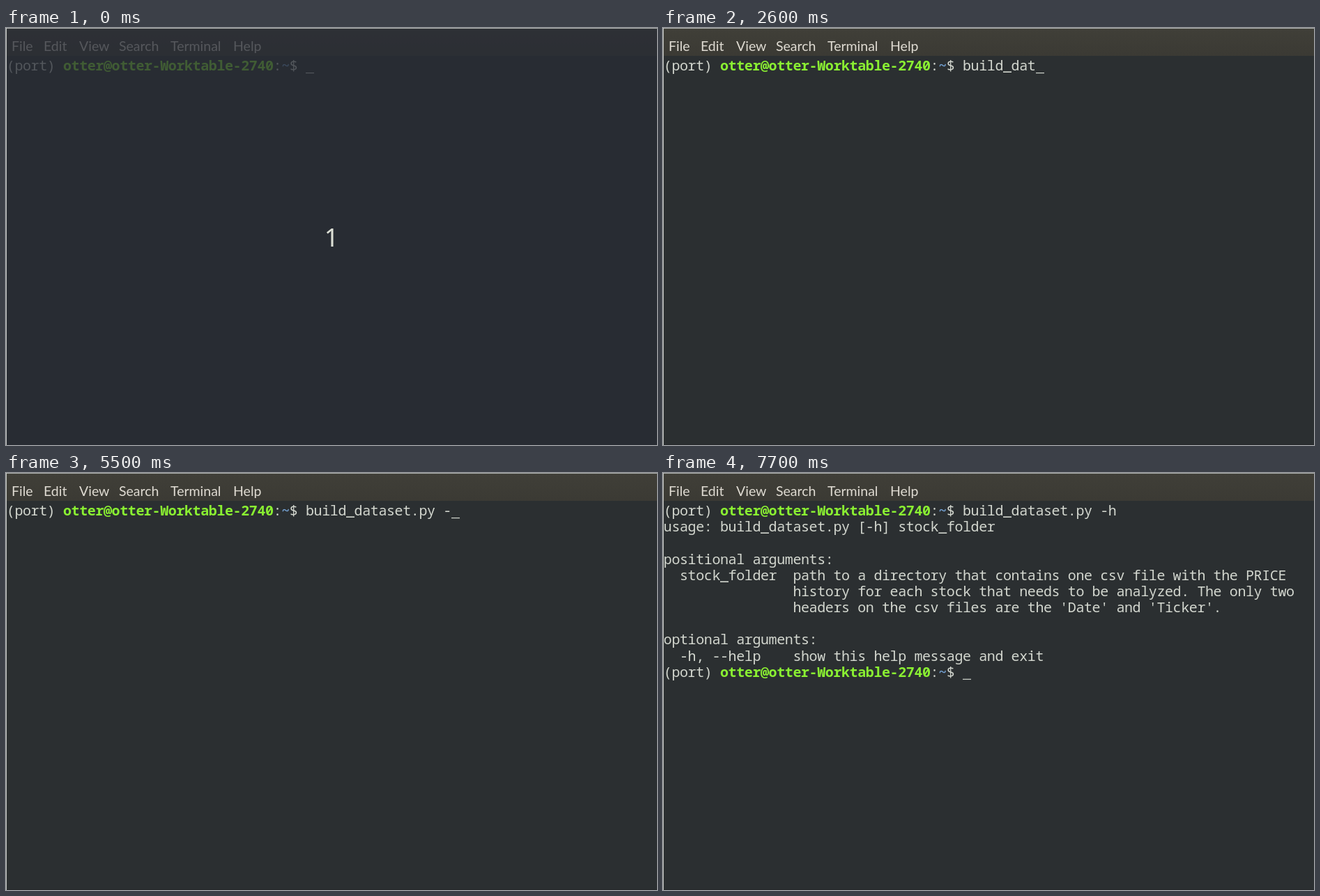
An HTML page with a canvas for the animation above (8000 ms loop, 934 by 599 pixels).

```html
<!DOCTYPE html>
<html lang="en">
<head>
<meta charset="utf-8">
<title>Terminal session</title>
<style>
  html, body { margin: 0; width: 100%; height: 100%; overflow: hidden; background: #2b2f31; }
  canvas { display: block; width: 934px; height: 599px; }
</style>
</head>
<body>
<canvas id="stage" width="934" height="599"></canvas>
<script>
const ctx = document.getElementById('stage').getContext('2d');
const LOOP = 8000, W = 934, H = 599;
const LEFT = 1, CELL = 11.6, ROW = 23.17, BASE = 61;
const TEXT = '#d3d7cf', GREEN = '#8af032', BLUE = '#729fcf';
const MONO = '20px "Noto Sans Mono", monospace';

const MENU = [['File', 8], ['Edit', 54], ['View', 105], ['Search', 162], ['Terminal', 236], ['Help', 326]];
const PROMPT = [['(port) ', TEXT], ['otter@otter-Worktable-2740', GREEN, true], [':', TEXT], ['~', BLUE, true], ['$ ', TEXT]];
const PROMPT_COLS = PROMPT.reduce((n, [s]) => n + s.length, 0);

const COMMAND = 'build_dataset.py -h';
// One key time per character of the command.
const KEYS = [900, 1000, 1100, 1300, 1500, 2200, 2300, 2500, 2600, 2800, 3100,
  3300, 3500, 3800, 4000, 4300, 5400, 5500, 5700];
const ENTER = 6700, OUTPUT = 7000, READY = 7100;
const HIDDEN = [[400, 800], [4900, 5200], [6200, 6500], [7200, 7700]];

const HELP = [
  'usage: build_dataset.py [-h] stock_folder',
  '',
  'positional arguments:',
  '  stock_folder  path to a directory that contains one csv file with the PRICE',
  '                history for each stock that needs to be analyzed. The only two',
  "                headers on the csv files are the 'Date' and 'Ticker'.",
  '',
  'optional arguments:',
  '  -h, --help    show this help message and exit'
];

function rect(x, y, w, h, color) {
  ctx.fillStyle = color;
  ctx.fillRect(x, y, w, h);
}

function label(str, x, y, font, color) {
  ctx.font = font;
  ctx.fillStyle = color;
  ctx.fillText(str, x, y);
}

// Places each character on the terminal grid.
function write(str, col, row, color = TEXT, bold = false) {
  const font = (bold ? 'bold ' : '') + MONO;
  [...str].forEach((ch, i) => {
    if (ch !== ' ') label(ch, LEFT + (col + i) * CELL - 0.2, BASE + row * ROW, font, color);
  });
}

function prompt(row) {
  let col = 0;
  for (const [str, color, bold] of PROMPT) {
    write(str, col, row, color, bold);
    col += str.length;
  }
}

function cursor(col, row) {
  rect(Math.round(LEFT + col * CELL), 64 + row * ROW, 12, 1.2, TEXT);
}

function drawWindow() {
  rect(0, 0, W, H, '#2b2f31');
  const bar = ctx.createLinearGradient(0, 1, 0, 40);
  bar.addColorStop(0, '#403f38');
  bar.addColorStop(1, '#3b3a34');
  rect(1, 1, W - 1, 39, bar);
  for (const [name, x] of MENU) label(name, x, 33, '19.5px Lato, sans-serif', '#dfdbd2');
  rect(1, H - 1, W - 1, 1, '#25282a');
  rect(0, 0, W, 1, '#a9aca8');
  rect(0, 0, 1, H, '#c6c9c5');
}

function drawSession(t) {
  const typed = KEYS.filter(k => k <= t).length;
  let col = PROMPT_COLS + typed, row = 0;
  prompt(0);
  write(COMMAND.slice(0, typed), PROMPT_COLS, 0);
  if (t >= ENTER) { col = 0; row = 1; }
  if (t >= OUTPUT) {
    HELP.forEach((line, i) => write(line, 0, i + 1));
    row = HELP.length + 1;
  }
  if (t >= READY) {
    prompt(row);
    col = PROMPT_COLS;
  }
  if (!HIDDEN.some(([from, to]) => t >= from && t < to)) cursor(col, row);
}

function drawCountdown() {
  rect(1, 1, W - 1, H - 1, 'rgba(39, 43, 52, 0.75)');
  ctx.textAlign = 'center';
  label('1', 467, 314, '36px "Noto Sans", sans-serif', '#dde0d6');
  ctx.textAlign = 'left';
}

const start = performance.now();
function frame() {
  const t = (performance.now() - start) % LOOP;
  drawWindow();
  drawSession(t);
  if (t < 100) drawCountdown();
  requestAnimationFrame(frame);
}
frame();
</script>
</body>
</html>
```
